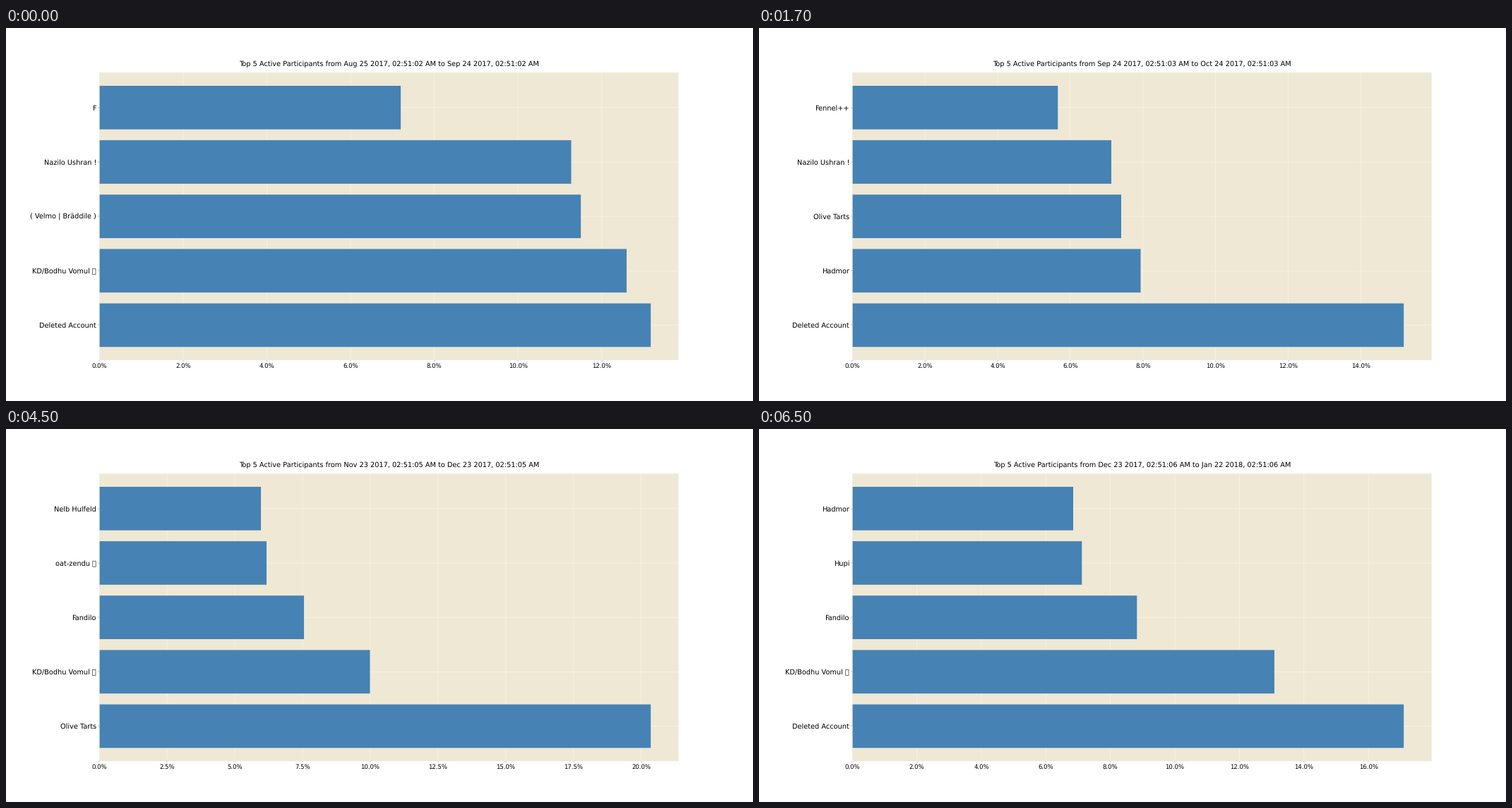
A matplotlib script that plays this animation: 1058 px wide and 529 px high, repeating every 8000 ms.

```python
import matplotlib.pyplot as plt
from matplotlib.animation import FuncAnimation
from matplotlib.ticker import FormatStrFormatter, MultipleLocator

SCALE = 10.58 / 24  # layout is designed for a 24 x 12 inch figure
PANEL, GRID, BAR, TICK = "#eee8d5", "#fdf6e3", "#4682b4", "#657b83"

plt.rcParams.update({
    "font.family": "DejaVu Sans",
    "text.hinting": "none",
    "axes.axisbelow": True,
})

BOX = "\U0001F9E9"  # no glyph in the font: shows as an empty box
GONE, NAZ, VEL = "Deleted Account", "Nazilo Ushran !", "( Velmo | Bräddile )"
KD, OLIVE, FEN = "KD/Bodhu Vomul " + BOX, "Olive Tarts", "Fennel++"
HAD, FAN = "Hadmor", "Fandilo"

DATES = ["Aug 25 2017", "Sep 24 2017", "Oct 24 2017",
         "Nov 23 2017", "Dec 23 2017", "Jan 22 2018"]

# (tick step, names from the bottom up, shares in percent)
PERIODS = [
    (2.0, [GONE, KD, VEL, NAZ, "F"], [13.17, 12.594, 11.50, 11.27, 7.198]),
    (2.0, [GONE, HAD, OLIVE, NAZ, FEN], [15.18, 7.936, 7.401, 7.129, 5.657]),
    (2.5, [OLIVE, HAD, KD, NAZ, FEN], [20.84, 13.124, 10.31, 7.565, 6.363]),
    (2.5, [OLIVE, KD, FAN, "oat-zendu " + BOX, "Nelb Hulfeld"],
     [20.35, 9.988, 7.552, 6.17, 5.962]),
    (2.0, [GONE, KD, FAN, "Hupi", HAD], [17.095, 13.085, 8.823, 7.115, 6.846]),
]
STARTS = [0, 1, 5, 9, 13]  # in steps of half a second
STEPS, INTERVAL = 16, 500

fig = plt.figure(figsize=(10.58, 5.29), dpi=100, facecolor="white")
ax = fig.add_axes([0.125, 0.11, 0.775, 0.77])


def style_axes(step):
    ax.set_facecolor(PANEL)
    ax.patch.set_snap(False)
    for spine in ax.spines.values():
        spine.set(color=PANEL, linewidth=0.8 * SCALE, snap=False)
    ax.grid(True, color=GRID, linewidth=SCALE, snap=False)
    ax.xaxis.set_major_locator(MultipleLocator(step))
    ax.xaxis.set_major_formatter(FormatStrFormatter("%.1f%%"))
    ax.tick_params(length=3.5 * SCALE, pad=3.5 * SCALE, width=0.8 * SCALE,
                   color=TICK, labelcolor="black")
    ax.tick_params(axis="x", labelsize=14 * SCALE)
    ax.tick_params(axis="y", labelsize=16 * SCALE)


def draw(i):
    k = sum(i >= s for s in STARTS) - 1
    step, names, shares = PERIODS[k]
    clock = f"02:51:{k + 2:02d} AM"
    ax.clear()
    ax.barh(range(5), shares, height=0.8, color=BAR, snap=False)
    ax.set_xlim(0, shares[0] * 1.05)
    ax.set_ylim(-0.64, 4.64)
    ax.set_yticks(range(5), names)
    style_axes(step)
    ax.set_title(f"Top 5 Active Participants from {DATES[k]}, {clock} "
                 f"to {DATES[k + 1]}, {clock}",
                 fontsize=16 * SCALE, pad=16 * SCALE)
    return []


anim = FuncAnimation(fig, draw, frames=STEPS, init_func=lambda: [],
                     interval=INTERVAL, repeat=True, repeat_delay=0)
plt.show()
```
